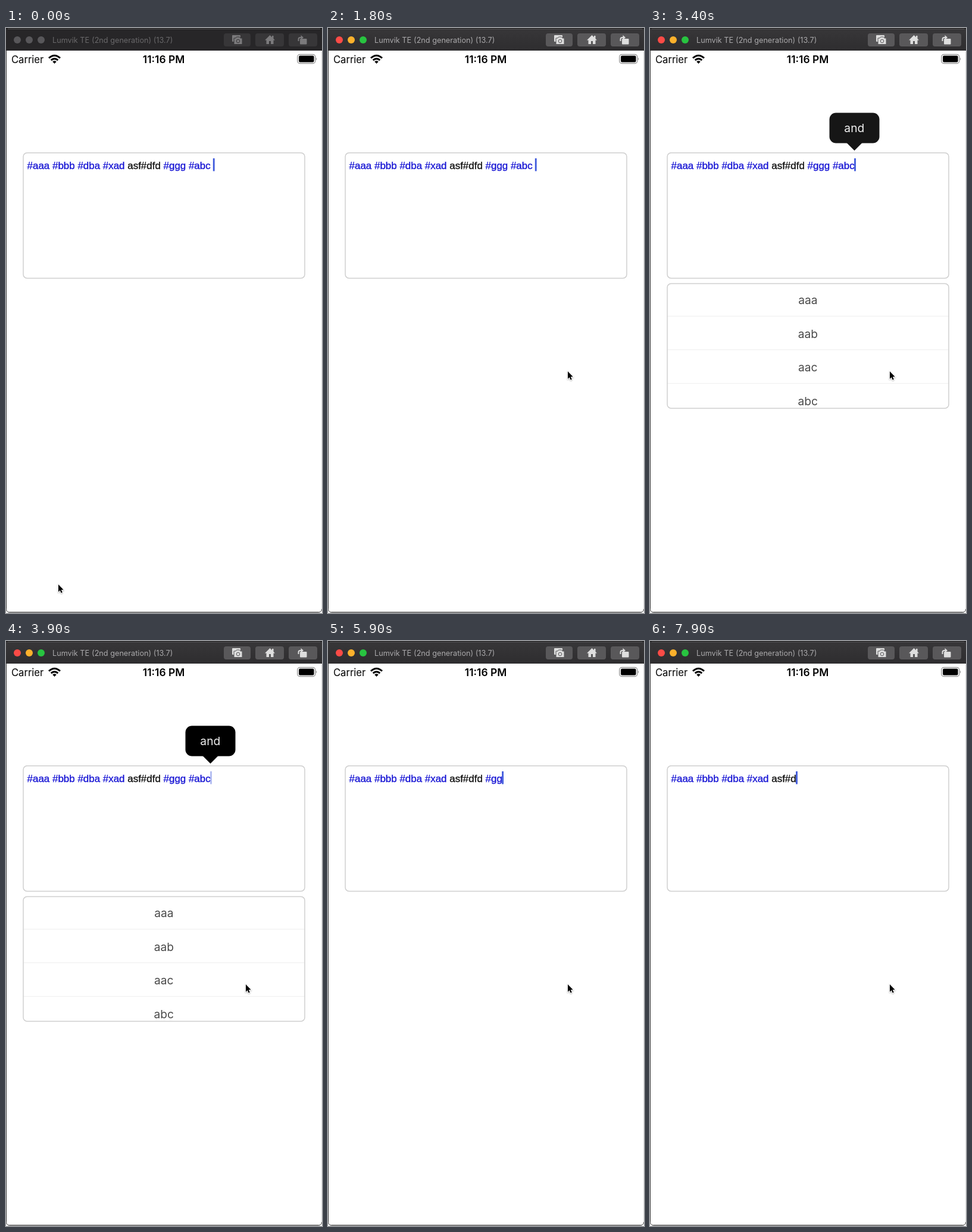
An HTML page for the animation above (8 s loop, 531 by 983 pixels).

```html
<!DOCTYPE html>
<html lang="en">
<head>
<meta charset="utf-8">
<title>Hashtag field</title>
<style>
  html, body { margin: 0; width: 100%; height: 100%; overflow: hidden; background: #fff; }
  svg { display: block; width: 531px; height: 983px; }
  text { font-family: Inter, Roboto, sans-serif; white-space: pre; }
  #entry { font: 16.95px "Liberation Sans", Arial, sans-serif; stroke-width: .35; }
  .mid { font-size: 19.2px; text-anchor: middle; }
</style>
</head>
<body>
<svg viewBox="0 0 531 983">
  <defs>
    <linearGradient id="barFill" x2="0" y2="1">
      <stop offset="0" stop-color="#383739"/><stop offset="1" stop-color="#2e2d2f"/>
    </linearGradient>
    <clipPath id="listWindow"><rect x="20" y="428" width="490" height="220"/></clipPath>
    <clipPath id="listShape"><rect x="29" y="429.5" width="473" height="209.5" rx="6"/></clipPath>
    <filter id="soft" x="-50%" y="-50%" width="200%" height="200%">
      <feDropShadow dx="0" dy="1" stdDeviation=".9" flood-opacity=".4"/>
    </filter>
  </defs>

  <rect width="531" height="983" fill="#fff"/>
  <path d="M530.500 38V976" stroke="#e4e4e4"/>
  <path d="M.5 38V976.500q0 5 5 5H525.500q5 0 5-5" fill="none" stroke="#3c3c3c"/>
  <path d="M4 982.500H527" stroke="#b4b4b4"/>

  <g id="bar">
    <rect id="barBack" width="531" height="38"/>
    <path d="M0 .5H531" stroke="#111"/>
    <path d="M3 1.500H528" stroke="#59585a"/>
    <circle class="light" cx="19" cy="20" r="6"/>
    <circle class="light" cx="39" cy="20" r="6"/>
    <circle class="light" cx="59" cy="20" r="6"/>
    <text id="title" y="25" font-size="12.7"><tspan x="78">Lumvik TE</tspan><tspan x="144">(2nd generation) (13.7)</tspan></text>
    <g id="buttons">
      <rect x="366" y="9" width="45" height="22" rx="4"/>
      <rect x="419" y="9" width="48" height="22" rx="4"/>
      <rect x="475" y="9" width="48" height="22" rx="4"/>
    </g>
    <g id="icons">
      <rect x="380" y="12" width="14" height="11" rx="1"/>
      <path class="cut" d="M383 17H386L387.500 15H392.500L394 17H397V27.500H383Z"/>
      <path d="M435 20.500L443.500 12L447 15.500V13H449.500V18L452 20.500H449.500V27H445V22H442V27H437.500V20.500Z"/>
      <rect x="494" y="18" width="11.500" height="9.500" rx="1"/>
      <path d="M490.500 22V19Q490.500 15 494.500 15H495.500V12L500 16L495.500 19.500V17H494.500Q492.500 17 492.500 19V22Z"/>
      <circle class="cut" cx="390" cy="22" r="2.800"/>
    </g>
  </g>

  <text x="9" y="58.500" font-size="16.6" fill="#111" stroke="#111" stroke-width=".15">Carrier</text>
  <g fill="none" stroke="#000" stroke-width="3">
    <path d="M72 50.500Q81.500 42 91 50.500"/>
    <path d="M75.700 54.200Q81.500 49 87.300 54.200"/>
  </g>
  <path d="M78.200 56.500Q81.500 53.800 84.800 56.500L81.500 60Z"/>
  <text x="265" y="58.500" font-size="17.4" font-weight="600" text-anchor="middle">11:16 PM</text>
  <rect x="489.700" y="44.500" width="30" height="15" rx="4" fill="none" stroke="#989898" stroke-width="1.4"/>
  <rect x="492" y="46.500" width="25.500" height="11" rx="2"/>
  <path d="M521 49.500Q523.500 52 521 54.500Z" fill="#999"/>

  <rect x="29" y="209.700" width="473" height="210.800" rx="6.500" fill="#fff" stroke="#cfcfcf" stroke-width="1.5"/>
  <text id="entry" x="35.600" y="237"></text>
  <rect id="caret" y="219" width="2.800" height="21.500" fill="#3f5adc"/>

  <g clip-path="url(#listWindow)">
    <g id="list">
      <rect x="29" y="429.500" width="473" height="209.500" rx="6.500" fill="#fff"/>
      <g id="rows" clip-path="url(#listShape)"></g>
      <rect x="29" y="429.500" width="473" height="209.500" rx="6.500" fill="none" stroke="#cfcfcf" stroke-width="1.5"/>
    </g>
  </g>

  <g id="bubbles"></g>
  <path id="cursor" d="M0 0V12.500L2.800 9.900L4.700 14.300L6.700 13.400L4.900 9H8.600Z" stroke="#fff" stroke-width="1.4" paint-order="stroke" filter="url(#soft)"/>
</svg>

<script>
const LOOP = 8000;
const FULL = '#aaa #bbb #dba #xad asf#dfd #ggg #abc ';
const $ = id => document.getElementById(id);
const clamp = v => Math.max(0, Math.min(1, v));
const ease = v => { v = clamp(v); return v * v * (3 - 2 * v); };
const ramp = (t, start, length) => clamp((t - start) / length);

// One character goes at each of these times
const deletions = [2970, 4150, 4460, 4760, 5070, 5370, 5760, 6160, 6560, 6870, 7270, 7660, 7860];
const caretGaps = [[250, 650], [1350, 1650], [2150, 2600], [3500, 3860]];
const cursorPath = [[0, 88, 935], [100, 88, 935], [1150, 309, 325], [1400, 311, 321], [1780, 403, 577]];

// Callouts: [fade in, fade out, fade length, left, right, arrow, dividers, labels]
const callouts = [
  [1850, 2980, 200, 177, 517, 348.5, [283, 417.5], [[230.5, 'Select'], [351, 'Select All'], [467, 'Paste']]],
  [3310, 4150, 200, 301.5, 385.5, 343.5, [], [[343.3, 'and']]],
  [5640, 5760, 110, 179, 425, 302, [], [[302, 'No Replacements Found']]],
  [7540, 7660, 130, 137, 383, 260, [], [[260, 'No Replacements Found']]]
];

const label = (x, y, text, fill) => `<text class="mid" x="${x}" y="${y}" fill="${fill}">${text}</text>`;

$('rows').innerHTML = ['aaa', 'aab', 'aac', 'abc'].map((word, i) => {
  const top = 427.7 + i * 56.5;
  return label(265.3, top + 36.3, word, '#4a4a4a') +
    (i ? `<path d="M29 ${top}H502" stroke="#ededed"/>` : '');
}).join('');

$('bubbles').innerHTML = callouts.map(([, , , left, right, arrow, dividers, labels]) =>
  `<g><rect x="${left}" y="142.500" width="${right - left}" height="51" rx="11"/>` +
  `<path d="M${arrow - 13} 193L${arrow} 206L${arrow + 13} 193Z"/>` +
  dividers.map(x => `<path d="M${x} 142.500V193.500" stroke="#4a4a4a"/>`).join('') +
  labels.map(([x, text]) => label(x, 175, text, '#eee')).join('') + '</g>').join('');

function showWindow(active) {
  const pick = (on, off) => active ? on : off;
  const button = pick('#59585a', '#373638');
  $('barBack').setAttribute('fill', pick('url(#barFill)', '#272628'));
  $('title').setAttribute('fill', pick('#aaa9ab', '#69686a'));
  $('buttons').setAttribute('fill', button);
  $('icons').setAttribute('fill', pick('#dedede', '#7b7a7c'));
  document.querySelectorAll('.cut').forEach(shape => shape.setAttribute('stroke', button));
  document.querySelectorAll('.light').forEach((light, i) =>
    light.setAttribute('fill', pick(['#fc4b46', '#fcb12c', '#28c440'][i], '#58575a')));
}

function showText(text) {
  const entry = $('entry');
  if (entry.textContent !== text) {
    entry.innerHTML = text.split(/( )/).map(part => {
      const color = /^#\w/.test(part) ? '#1614d4' : '#111';
      return `<tspan fill="${color}" stroke="${color}">${part}</tspan>`;
    }).join('');
  }
  $('caret').setAttribute('x', 35 + entry.getComputedTextLength());
}

function cursorAt(t) {
  const next = cursorPath.findIndex(point => point[0] > t);
  if (next < 0) return cursorPath.at(-1).slice(1);
  const [t0, x0, y0] = cursorPath[next - 1], [t1, x1, y1] = cursorPath[next];
  const k = ease((t - t0) / (t1 - t0));
  return [x0 + (x1 - x0) * k, y0 + (y1 - y0) * k];
}

function draw(t) {
  showWindow(t >= 1450);
  showText(FULL.slice(0, FULL.length - deletions.filter(time => t >= time).length));

  const caret = caretGaps.reduce((shown, [off, on]) =>
    Math.min(shown, 1 - ramp(t, off, 100) + ramp(t, on, 100)), 1);
  $('caret').setAttribute('opacity', caret);

  const open = ease((t - 3020) / 300) - ease((t - 4745) / 300);
  $('list').setAttribute('transform', `translate(0 ${-212 * (1 - open)})`);
  $('list').style.display = open > 0 ? '' : 'none';

  callouts.forEach(([start, end, fade], i) => {
    const opacity = ramp(t, start, Math.min(fade, 100)) - ramp(t, end, fade);
    $('bubbles').children[i].setAttribute('opacity', Math.max(0, opacity));
  });
  $('cursor').setAttribute('transform', `translate(${cursorAt(t)})`);
}

const began = performance.now();
function tick() {
  draw((performance.now() - began) % LOOP);
  requestAnimationFrame(tick);
}
tick();
</script>
</body>
</html>
```
